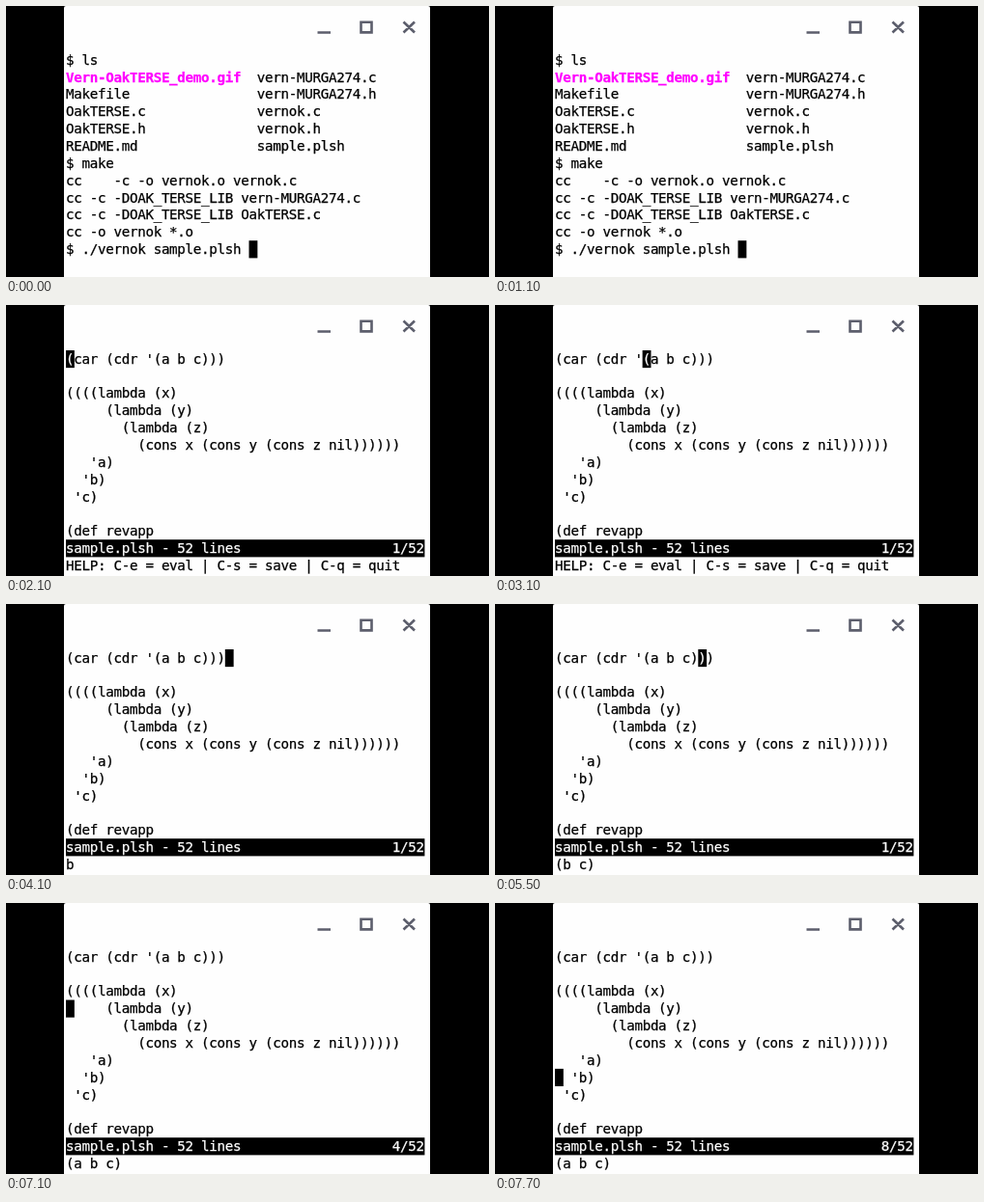
An HTML page with a canvas for the animation above (8000 ms loop, 500 px wide and 281 px high).

```html
<!DOCTYPE html>
<html lang="en">
<head>
<meta charset="utf-8">
<title>Terminal session</title>
<style>
html, body { margin: 0; width: 100%; height: 100%; overflow: hidden; background: #000; }
canvas { display: block; }
</style>
</head>
<body>
<canvas id="stage" width="500" height="281"></canvas>
<script>
const ctx = document.getElementById('stage').getContext('2d');
const LOOP = 8000, LEFT = 62, TOP = 47, CELL_W = 8.24, CELL_H = 17.84, COLS = 45;
const PAPER = '#fefefe', INK = '#000';
const FONT = '14.2px "DejaVu Sans Mono", "Liberation Mono", monospace';

const shell = [
  '$ ls',
  'Vern-OakTERSE_demo.gif  vern-MURGA274.c',
  'Makefile                vern-MURGA274.h',
  'OakTERSE.c              vernok.c',
  'OakTERSE.h              vernok.h',
  'README.md               sample.plsh',
  '$ make',
  'cc    -c -o vernok.o vernok.c',
  'cc -c -DOAK_TERSE_LIB vern-MURGA274.c',
  'cc -c -DOAK_TERSE_LIB OakTERSE.c',
  'cc -o vernok *.o',
  '$ ./vernok sample.plsh '
];
const script = [
  "(car (cdr '(a b c)))",
  '',
  '((((lambda (x)',
  '     (lambda (y)',
  '       (lambda (z)',
  '         (cons x (cons y (cons z nil))))))',
  "   'a)",
  "  'b)",
  " 'c)",
  '',
  '(def revapp'
];
const messages = [
  [2100, 'HELP: C-e = eval | C-s = save | C-q = quit'],
  [4100, 'b'],
  [4900, '(b c)'],
  [6100, '(a b c)']
];

const cellX = col => LEFT + col * CELL_W;
const cellY = row => TOP + row * CELL_H;

// A thin outline gives the glyphs the weight of a bitmap font.
function print(text, row, col = 0, color = INK, bold = false) {
  ctx.font = (bold ? 'bold ' : '') + FONT;
  ctx.fillStyle = ctx.strokeStyle = color;
  ctx.lineWidth = 0.25;
  [...text].forEach((ch, i) => {
    const x = cellX(col + i), y = cellY(row) + 13.8;
    ctx.fillText(ch, x, y);
    ctx.strokeText(ch, x, y);
  });
}

function block(row, col, cols = 1) {
  ctx.fillStyle = INK;
  ctx.fillRect(cellX(col), cellY(row), cols * CELL_W + 0.6, CELL_H + 0.3);
}

function drawWindow() {
  ctx.fillStyle = INK;
  ctx.fillRect(0, 0, 500, 281);
  ctx.fillStyle = PAPER;
  ctx.beginPath();
  ctx.roundRect(60, 0, 379, 281, [2, 2, 0, 0]);
  ctx.fill();
  ctx.strokeStyle = '#5c5e6c';
  ctx.lineWidth = 2.6;
  ctx.beginPath();
  ctx.moveTo(322.5, 27.5);
  ctx.lineTo(336, 27.5);
  ctx.rect(367.5, 16.8, 11, 10.6);
  ctx.moveTo(411.5, 16.5);
  ctx.lineTo(423, 27.5);
  ctx.moveTo(423, 16.5);
  ctx.lineTo(411.5, 27.5);
  ctx.stroke();
}

function drawShell() {
  const name = shell[1].split(' ')[0];
  shell.forEach((line, row) => print(row === 1 ? line.replace(name, ' '.repeat(name.length)) : line, row));
  print(name, 1, 0, '#f0f', true);
  block(11, 23);
}

function cursorAt(t) {
  const tick = Math.floor((t - 100) / 200) * 200 + 100;
  if (t < 4500) return [0, Math.min(20, Math.round((tick - 2100) / 90))];
  if (t < 5500) return [0, 19];
  if (t < 6700) return [0, 18];
  return [Math.min(7, 1 + Math.round((tick - 6700) / 1000 * 6)), 0];
}

function drawEditor(t) {
  const [row, col] = cursorAt(t);
  script.forEach((line, i) => print(line, i));
  block(row, col);
  print(script[row][col] || '', row, col, PAPER);

  const place = `${row + 1}/52`;
  block(11, 0, COLS);
  print('sample.plsh - 52 lines', 11, 0, PAPER);
  print(place, 11, COLS - place.length, PAPER);
  print(messages.filter(([start]) => t >= start).pop()[1], 12);
}

function frame(now) {
  const t = now % LOOP;
  drawWindow();
  if (t < 2100) drawShell();
  else drawEditor(t);
  requestAnimationFrame(frame);
}
requestAnimationFrame(frame);
</script>
</body>
</html>
```
